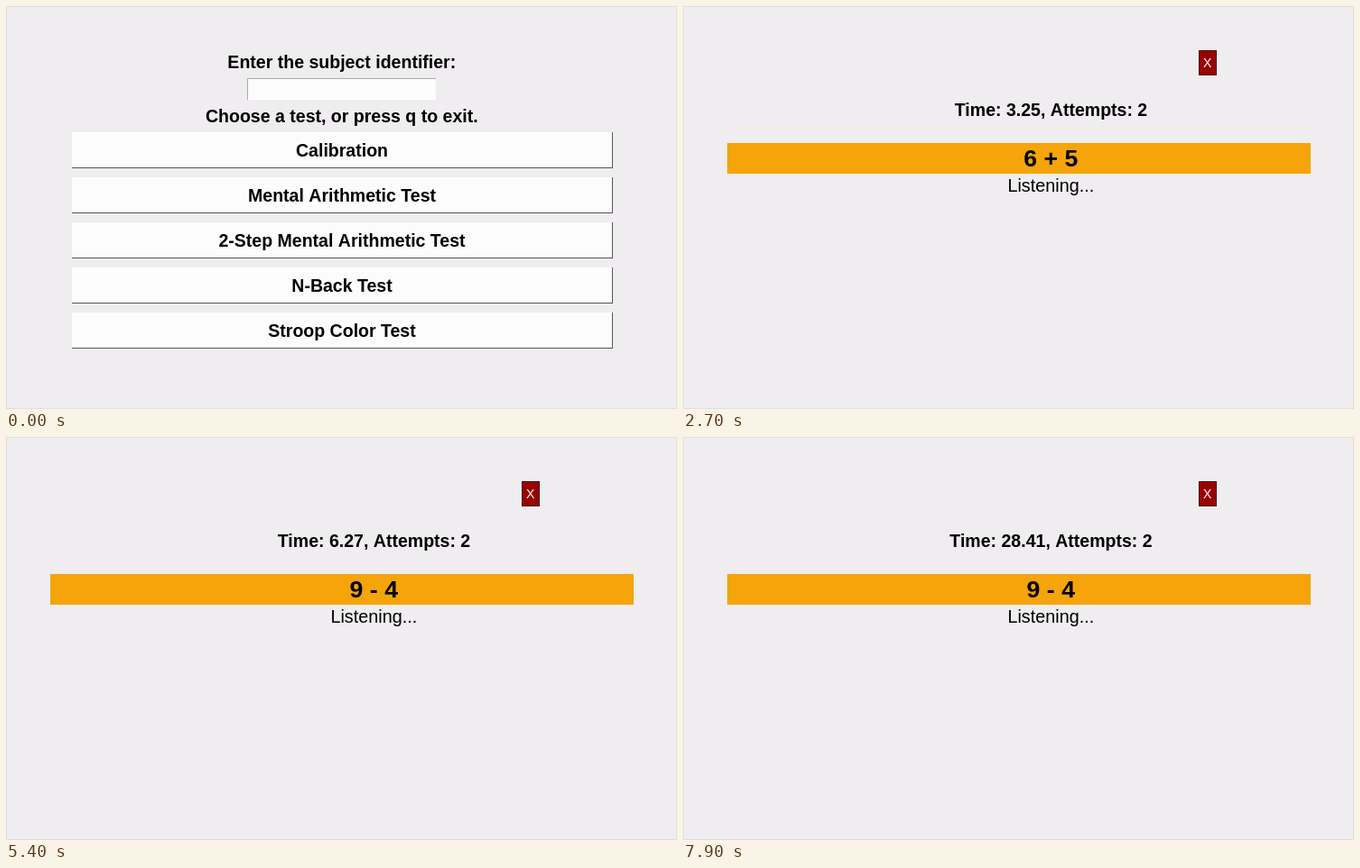
An HTML page with a canvas for the animation above (8000 ms loop, 743 px wide and 447 px high).

```html
<!DOCTYPE html>
<html>
<head>
<meta charset="utf-8">
<style>
html, body { margin: 0; width: 100%; height: 100%; overflow: hidden; background: #efedef; }
canvas { display: block; }
</style>
</head>
<body>
<canvas id="stage" width="743" height="447"></canvas>
<script>
const ctx = document.getElementById('stage').getContext('2d');
const LOOP = 8000;
const tests = ['Calibration', 'Mental Arithmetic Test', '2-Step Mental Arithmetic Test',
  'N-Back Test', 'Stroop Color Test'];
const columns = [[83, 'EASY', 'ADDITION'], [197, 'MEDIUM', 'SUBTRACTION'],
  [358, 'HARD', 'MULTIPLICATION'], [540, 'SKIP', 'DIVISION']];

// Pointer path and elapsed-seconds path: [ms, values...]
const pointer = [[100, 719, 290], [600, 400, 212], [800, 400, 212], [1000, 86, 92],
  [1100, 86, 122], [1300, 352, 188], [1500, 200, 122], [1800, 352, 180], [1900, 366, 300]];
const firstClock = [[1900, 0.78], [2700, 3.25], [3400, 5.41]];
const secondClock = [[3400, 0.08], [3800, 1.32], [5400, 6.27], [7000, 11.21],
  [7200, 11.83], [7900, 28.41]];

function along(path, t) {
  let i = 1;
  while (i < path.length - 1 && t > path[i][0]) i++;
  const a = path[i - 1], b = path[i];
  const k = Math.min(1, Math.max(0, (t - a[0]) / (b[0] - a[0])));
  return a.slice(1).map((v, j) => v + (b[j + 1] - v) * k);
}

function rect(color, x, y, w, h) {
  ctx.fillStyle = color;
  ctx.fillRect(x, y, w, h);
}

function text(str, x, y, { size = 20, bold = false, color = '#000', align = 'center' } = {}) {
  ctx.font = `${bold ? 'bold ' : ''}${size}px "Liberation Sans", Arial, sans-serif`;
  ctx.textAlign = align;
  ctx.fillStyle = color;
  ctx.fillText(str, x, y);
}

const heading = (str, x, y, size = 19.55) => text(str, x, y, { size, bold: true });

function button(x, y, w, h) {
  rect('#555', x, y, w, h);
  rect('#fdfcfd', x, y, w - 1, h - 1);
}

function closeButton(x) {
  rect('#4a0808', x, 49, 20, 28);
  rect('#990000', x + 1, 50, 18, 26);
  text('X', x + 9.7, 68, { size: 14, color: '#fff' });
}

function checkbox(x, y, checked) {
  rect('#fff', x, y, 6, 6);
  rect('#888', x, y, 6, 1);
  rect('#888', x, y, 1, 6);
  if (!checked) return;
  ctx.strokeStyle = '#111';
  ctx.lineWidth = 1.3;
  ctx.beginPath();
  ctx.moveTo(x + 1.5, y + 2.5);
  ctx.lineTo(x + 2.7, y + 4.2);
  ctx.lineTo(x + 5.2, y + 1.5);
  ctx.stroke();
}

function menu() {
  heading('Enter the subject identifier:', 371.8, 69);
  rect('#aaa', 267, 80, 209, 24);
  rect('#fdfcfd', 268, 81, 208, 23);
  heading('Choose a test, or press q to exit.', 371.8, 129);
  tests.forEach((name, i) => {
    button(73, 140 + 50 * i, 599, 40);
    heading(name, 372, 167 + 50 * i);
  });
}

function settings(t) {
  closeButton(643);
  columns.forEach(([x, level, operation], i) => {
    checkbox(x, 89, i === 0 && t >= 1000);
    checkbox(x, 120, i === 0 && t >= 1100 || i === 1 && t >= 1500);
    text(level, x + 14, 99, { align: 'left' });
    text(operation, x + 14, 130, { align: 'left' });
  });
  button(212, 156, 300, 39);
  text('Start Test', 361.5, 182);
}

function question(t) {
  const second = t >= 3400;
  const [seconds] = along(second ? secondClock : firstClock, t);
  closeButton(571);
  heading(`Time: ${+seconds.toFixed(2)}, Attempts: 2`, 407.5, 122);
  rect('#f5a409', 49, 152, 646, 34);
  heading(second ? '9 - 4' : '6 + 5', 407.3, 178, 26.7);
  text('Listening...', 407.3, 206, { size: 19.8 });
  if (second && t < 4400) text('Correct', 407.3, 231, { size: 19.8, color: '#008c00' });
}

function arrow(x, y) {
  ctx.beginPath();
  [[0, 0], [0, 12], [2.8, 9.5], [4.8, 14], [6.7, 13.2], [4.8, 8.8], [8.6, 8.6]]
    .forEach(([dx, dy]) => ctx.lineTo(x + dx + 0.5, y + dy + 0.5));
  ctx.closePath();
  ctx.fillStyle = '#fff';
  ctx.fill();
  ctx.strokeStyle = '#444';
  ctx.lineWidth = 1;
  ctx.stroke();
}

function draw(now) {
  const t = Math.floor(now % LOOP / 100) * 100;
  rect('#e0dfe0', 0, 0, 743, 447);
  rect('#efedef', 1, 1, 741, 445);
  if (t < 700) menu();
  else if (t < 1900) settings(t);
  else question(t);
  if (t >= 100 && t <= 1900) arrow(...along(pointer, t));
  requestAnimationFrame(draw);
}
requestAnimationFrame(draw);
</script>
</body>
</html>
```
